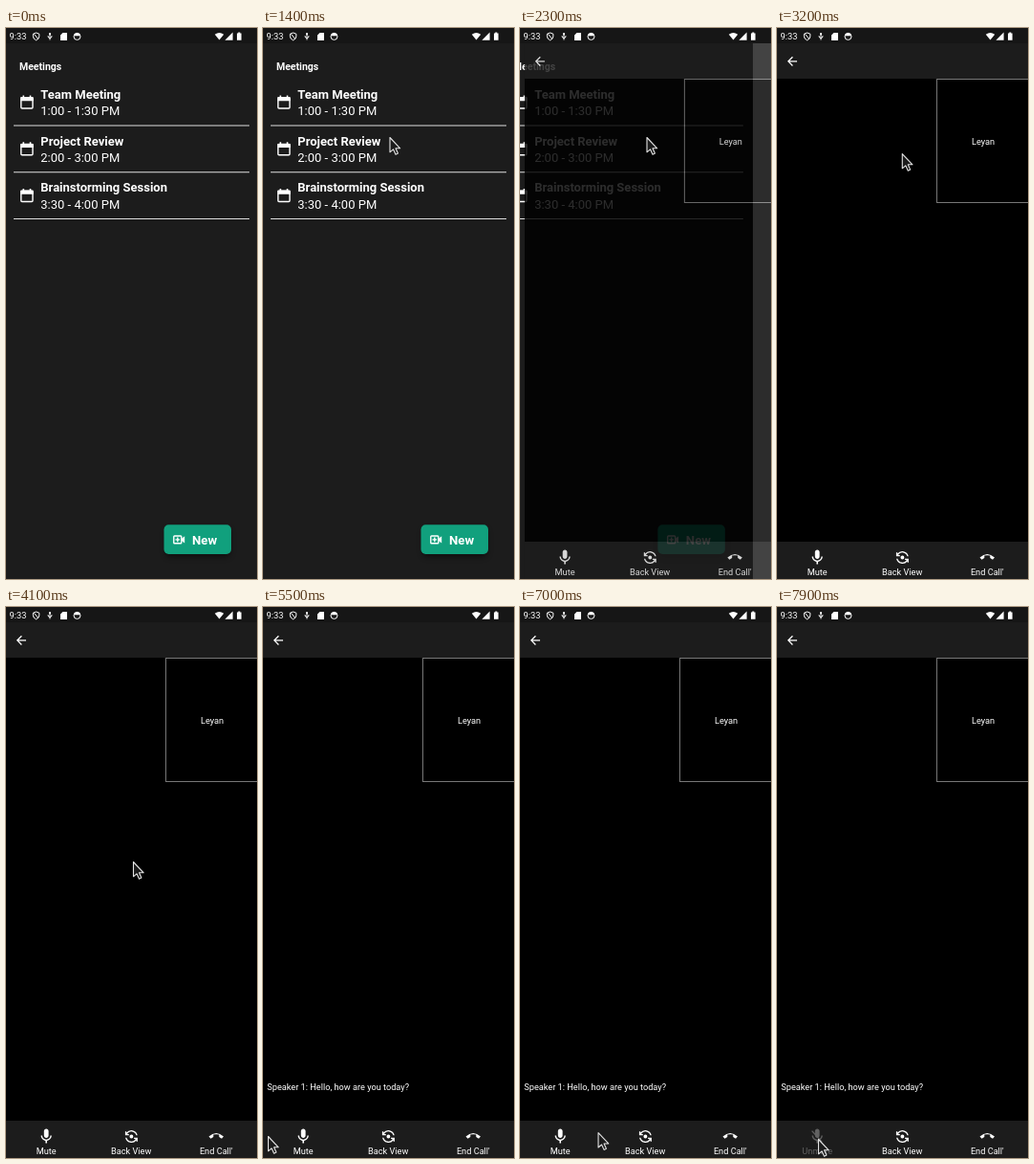
Animation, 263 px wide and 576 px high, one loop 8000 ms. Source, as an HTML page:

```html
<!DOCTYPE html>
<html lang="en">
<head>
<meta charset="utf-8">
<title>Meetings</title>
<style>
  html, body { margin: 0; width: 100%; height: 100%; overflow: hidden; background: #1c1c1c; }
  svg { display: block; width: 263px; height: 576px; font-family: Roboto, sans-serif; }
  text { fill: #fff; }
  .b { font-weight: 700; }
  .row { font-size: 13px; }
  .small { font-size: 9.2px; }
  .mid { text-anchor: middle; }
  .line { fill: none; stroke: #fff; }
  .icon { fill: #fff; }
</style>
</head>
<body>
<svg viewBox="0 0 263 576">
  <defs>
    <filter id="soft" x="-20%" y="-40%" width="140%" height="200%"><feGaussianBlur stdDeviation="3"/></filter>
  </defs>

  <rect width="263" height="576" fill="#1c1c1c"/>
  <g id="list">
    <text class="b" x="14" y="44" font-size="10.5">Meetings</text>
    <g id="rows"></g>
    <rect x="167" y="523" width="68" height="30" rx="5" opacity=".45" filter="url(#soft)"/>
    <rect x="165.5" y="519.3" width="70.5" height="30.7" rx="5" fill="#11a07d"/>
    <g class="line" stroke-width="1.4">
      <rect x="175.8" y="531" width="8" height="7.8" rx=".8"/>
      <path d="M179.8 532.6v4.6M177.5 534.9h4.6"/>
    </g>
    <path class="icon" d="M184 533.8l3.2-2.6v7.4l-3.2-2.6z"/>
    <text class="b" x="195" y="539.8" font-size="13.2">New</text>
    <!-- blank window behind the sliding screen -->
    <rect x="265.2" width="40" height="576" fill="#fff"/>
  </g>

  <g id="call">
    <path d="M0 53h263v484H0z"/>
    <path fill="#1c1c1c" d="M0 16h263v37H0zM0 537h263v39H0z"/>
    <path class="icon" transform="translate(8.4 27.3) scale(.63)" d="M20 11H7.8l5.6-5.6L12 4l-8 8 8 8 1.4-1.4L7.8 13H20z"/>
    <rect x="167.5" y="53.5" width="100" height="129" fill="#000" stroke="#777"/>
    <text class="small mid" x="216" y="121.8">Leyan</text>
    <text class="small" id="caption" x="4.3" y="504.8">Speaker 1: Hello, how are you today?</text>
    <g id="mute">
      <path class="icon" transform="translate(32.6 543.8) scale(.8)" d="M12 14c1.66 0 3-1.34 3-3V5c0-1.66-1.34-3-3-3S9 3.34 9 5v6c0 1.66 1.34 3 3 3zm5.3-3c0 3-2.54 5.1-5.3 5.1S6.7 14 6.7 11H5c0 3.41 2.72 6.23 6 6.72V21h2v-3.28c3.28-.48 6-3.3 6-6.72z"/>
      <path id="slash" d="M36.6 547.6L47.2 559.4" class="line" stroke-width="1.3"/>
      <text class="small mid" id="muteLabel" x="42.2" y="571.6"></text>
    </g>
    <path class="icon" transform="translate(123.6 545.7) scale(.65)" d="M9 12a3 3 0 0 0 6 0 3 3 0 0 0-6 0zM8 10V8H5.1A8 8 0 0 1 19.7 10h2.1A10 10 0 0 0 4 6V4H2v6zM16 14v2h2.9A8 8 0 0 1 4.300 14H2.200A10 10 0 0 0 20 18v2h2v-6z"/>
    <text class="small mid" x="131.2" y="571.6">Back View</text>
    <path class="icon" d="M212.5 553.6Q220.3 546.5 228 553.6L226 555.8 223.3 554V551.6Q220.3 550.8 217.3 551.6V554L214.6 555.8Z"/>
    <text class="small mid" x="220.3" y="571.6">End Call'</text>
  </g>

  <g>
    <rect width="263" height="16" fill="#161616"/>
    <text x="3.5" y="12.4" font-size="9.3">9:33</text>
    <path class="line" d="M31.6 5l3.2 1.2v2.6q0 2.6-3.2 4-3.2-1.4-3.2-4V6.2zM29.5 6.4l4 4.8M46 5v7.5M44 8.2q0 2.4 2 2.4t2-2.4"/>
    <circle class="icon" cx="46" cy="6.3" r="1.1"/>
    <circle class="line" cx="74.5" cy="8.9" r="3.5"/>
    <path class="icon" d="M59.5 5H64v8h-7V7.5zM71 8.2q.8-3 3.5-3t3.5 3z"/>
    <path class="icon" d="M218.8 6.8q4.7-3.6 9.4 0L223.5 12.6zM237.6 4.6v8.2h-8.2zM242 5.5h1.3v-1h2v1h1.3v7.3H242z"/>
  </g>

  <path id="cursor" fill="#1c1c1c" stroke="#e4e4e4" stroke-width="1.1" stroke-linejoin="round"
        d="M.5 .5V15.8L4 12.8 6.5 18.2 8.9 17.1 6.5 11.8H11.2Z"/>
</svg>
<script>
  const LOOP = 8000, STEP = 100;
  const $ = id => document.getElementById(id);
  const show = (el, on) => { el.style.display = on ? '' : 'none'; };
  const moveTo = (el, x, y = 0) => el.setAttribute('transform', `translate(${x} ${y})`);
  const clamp = v => Math.min(1, Math.max(0, v));

  const meetings = [
    ['Team Meeting', '1:00 - 1:30 PM'],
    ['Project Review', '2:00 - 3:00 PM'],
    ['Brainstorming Session', '3:30 - 4:00 PM'],
  ];
  $('rows').innerHTML = meetings.map(([name, time], i) => `
    <g transform="translate(0 ${i * 48.75})">
      <rect x="15.8" y="72.7" width="12.2" height="11.3" rx="1" class="line" stroke-width="1.4"/>
      <path class="icon" d="M15.2 72.2h13.4v4H15.2zM17.5 70.5h1.6v2h-1.6zM24.7 70.5h1.6v2h-1.6z"/>
      <text class="row b" x="36.3" y="73.8">${name}</text>
      <text class="row" x="36.3" y="91.2">${time}</text>
      <rect x="8" y="101.5" width="247" height="1" fill="#ddd"/>
    </g>`).join('');
  const pressedRow = $('rows').children[1];

  // Pointer gestures: start, end and the path the tip follows at even speed.
  const gesture = (start, end, d) => {
    const path = document.createElementNS('http://www.w3.org/2000/svg', 'path');
    path.setAttribute('d', d);
    return { start, end, path, length: path.getTotalLength() };
  };
  const gestures = [
    gesture(0, 1000, 'M-20 0h-1'),
    gesture(1100, 1400, 'M51 162L82 144 132.5 114'),
    gesture(3100, 3500, 'M132.5 114C105 120 150 150 196 162'),
    gesture(3700, 4100, 'M196 162C180 130 135 200 133 266'),
    gesture(4100, 4300, 'M133 266Q126 290 136 311'),
    gesture(4500, 5000, 'M136 311L-20 520'),
    gesture(5500, 6400, 'M5 553C5 505 10 501 40 501H105'),
    gesture(6400, 7200, 'M105 501C185 501 130 545 43 557'),
    gesture(7200, 7500, 'M43 557Q20 556 43 556'),
  ];

  function pointerAt(t) {
    const { start, end, path, length } = gestures.findLast(g => g.start <= t);
    return path.getPointAtLength(length * clamp((t - start) / (end - start)));
  }

  function draw(t) {
    // Both screens travel the same distance while the call fades in.
    const travel = 26;
    const slide = 1 - Math.exp(-Math.max(0, t - 2192) / 64.5);
    moveTo($('list'), -travel * slide);
    moveTo($('call'), travel * (1 - slide));
    $('call').setAttribute('opacity', clamp((slide - .12) / .84));
    pressedRow.setAttribute('opacity', t >= 1800 && t < 2300 ? .3 : 1);

    const muted = t >= 7900;
    show($('caption'), t >= 5000);
    show($('slash'), muted);
    $('muteLabel').textContent = muted ? 'Unmute' : 'Mute';
    $('mute').setAttribute('opacity', t >= 7800 ? .3 : 1);

    const tip = pointerAt(t);
    moveTo($('cursor'), tip.x, tip.y);
  }

  const start = performance.now();
  function tick() {
    const t = (performance.now() - start) % LOOP;
    draw(t - t % STEP);
    requestAnimationFrame(tick);
  }
  tick();
</script>
</body>
</html>
```
